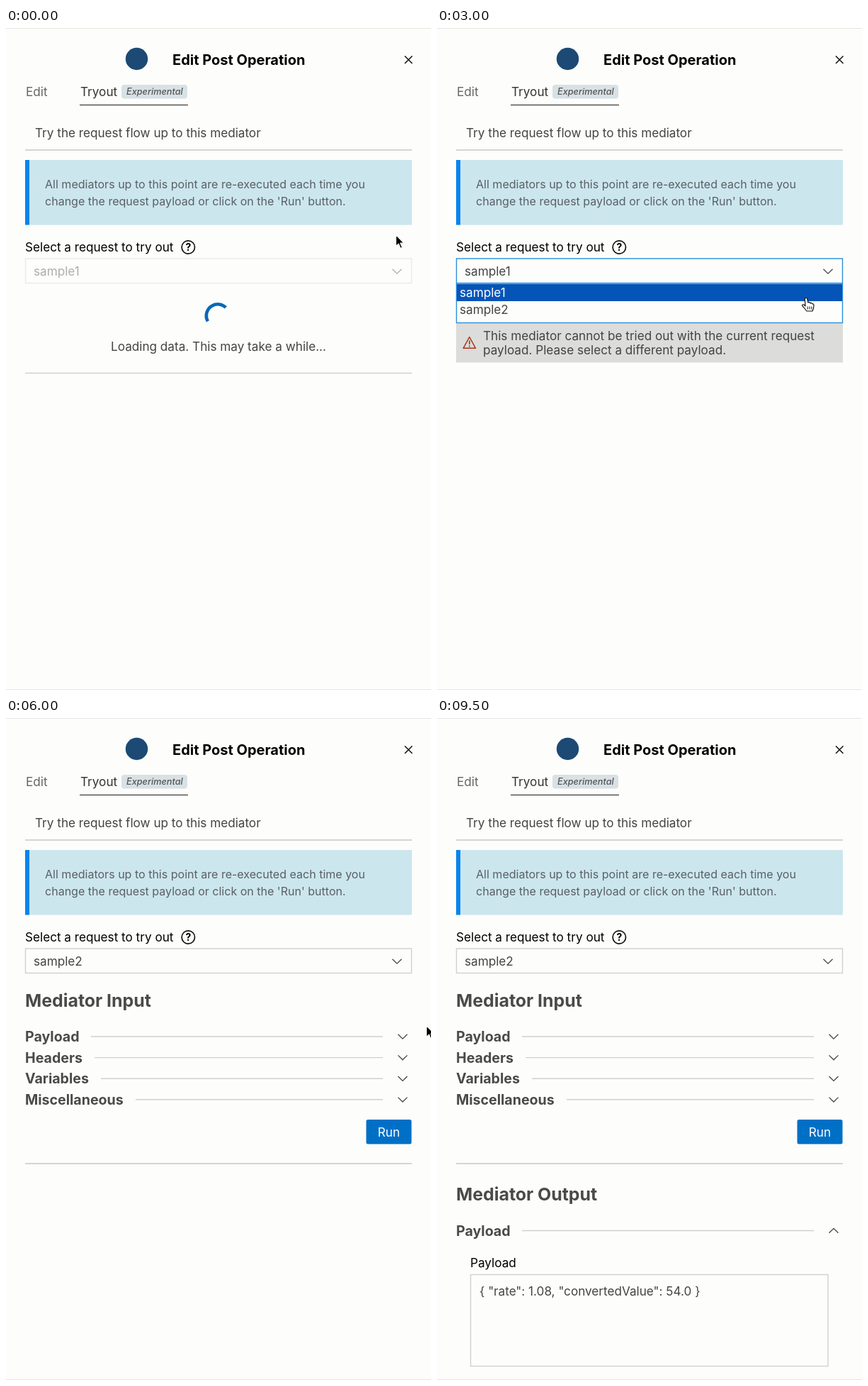
An HTML page that plays this animation: 600x933 px, repeating every 9600 ms.

```html
<!DOCTYPE html>
<html lang="en">
<head>
<meta charset="utf-8">
<title>Edit Post Operation</title>
<style>
  html, body { margin: 0; width: 100%; height: 100%; overflow: hidden; background: #fdfdfb; }
  svg { display: block; width: 600px; height: 933px; font: 17.15px Inter, "Open Sans", sans-serif; fill: #444; cursor: default; }
  .title { font-size: 20px; font-weight: 700; fill: #000; }
  .heading { font-size: 24.9px; font-weight: 700; fill: #4a4a4a; }
  .section { font-size: 19.6px; font-weight: 700; fill: #4a4a4a; }
  .line { fill: none; stroke-linecap: butt; }
  .black { fill: #000; }
</style>
</head>
<body>
<svg id="stage" viewBox="0 0 600 933"></svg>
<script>
const LOOP = 9600, STEP = 100;
const BG = '#fdfdfb', RULE = '#c9c9c9', BORDER = '#d0d0d2', FOCUS = '#2a8fdc';
const stage = document.getElementById('stage');

const text = (x, y, s, attrs = '') => `<text x="${x}" y="${y}" ${attrs}>${s}</text>`;
const rect = (x, y, w, h, fill, attrs = '') =>
  `<rect x="${x}" y="${y}" width="${w}" height="${h}" fill="${fill}" ${attrs}/>`;
const path = (d, color, width = 1.3, attrs = '') =>
  `<path class="line" d="${d}" stroke="${color}" stroke-width="${width}" ${attrs}/>`;
const rule = (x1, x2, y, color = RULE, width = 1.3) => path(`M${x1} ${y}H${x2}`, color, width);
const chevron = (x, y, up = false) => {
  const d = up ? -3.2 : 3.2;
  return path(`M${x - 6.5} ${y - d}L${x} ${y + d}L${x + 6.5} ${y - d}`, '#444');
};
const group = (id, content) => `<g id="${id}">${content}</g>`;

const SECTIONS = [['Payload', 120], ['Headers', 125], ['Variables', 134], ['Miscellaneous', 183]];
const section = ([name, lineX], y, up) =>
  text(27, y + 7, name, 'class="section"') + rule(lineX, 532, y, BORDER, 1.4) + chevron(560, y, up);
const sections = (list, y) => list.map((s, i) => section(s, y + i * 29.6)).join('');

const header =
  rule(0, 600, .5, '#e4e4e0', 1) + rule(0, 600, 932.5, '#e4e4e0', 1) +
  '<circle cx="184.5" cy="43.5" r="15.7" fill="#1c4a74"/>' +
  text(235, 52, 'Edit Post Operation', 'class="title"') +
  path('M563 39.5L573.5 50M573.5 39.5L563 50', '#111', 1.5) +
  text(28, 96, 'Edit', 'fill="#666"') + text(105, 96, 'Tryout', 'fill="#333"') +
  rect(163, 80, 93, 19.5, '#d8e1e5', 'rx="4"') +
  text(170, 94, 'Experimental', 'font-size="12.7" font-style="italic" font-weight="500" fill="#555"') +
  rule(104, 257, 108.5, '#555') +
  text(41, 154, 'Try the request flow up to this mediator') +
  rule(27, 573, 172) +
  rect(27, 186, 546, 91.5, '#cce6ee') + rect(27, 186, 6, 91.5, '#0a84ec') +
  '<g font-size="16.05" fill="#5a6064">' +
  text(55, 226, 'All mediators up to this point are re-executed each time you') +
  text(55, 250, "change the request payload or click on the 'Run' button.") + '</g>' +
  text(27, 315, 'Select a request to try out', 'class="black"') +
  '<circle cx="257.3" cy="309" r="9.2" fill="none" stroke="#111" stroke-width="1.7"/>' +
  text(257.3, 314, '?', 'class="black" font-size="14" font-weight="700" text-anchor="middle"');

const select = rect(27.5, 325, 545, 34.5, BG, `id="selectBox" stroke="${BORDER}" stroke-width="1.4"`) +
  text(39, 349, '', 'id="selected"') + chevron(552, 343);

const loading =
  '<circle id="ring" cx="299" cy="405.5" r="16.2" fill="none" stroke="#0868b8" stroke-width="4.6"/>' +
  text(300, 455, 'Loading data. This may take a while...', 'text-anchor="middle"') +
  rule(27, 573, 486.3);

const failure = rule(27, 573, 387.3, BORDER) + rect(27, 415.5, 546, 56, '#dcdcda') +
  path('M45.8 435.5L54.5 451.3H37.1Z', '#a8341a', 1.5, 'stroke-linejoin="round"') +
  path('M45.8 440.5V446M45.8 447.6V449.4', '#a8341a', 1.6) +
  text(65, 440, 'This mediator cannot be tried out with the current request') +
  text(65, 460.3, 'payload. Please select a different payload.');

const options = rect(27.5, 360, 545, 55.5, BG, `stroke="${FOCUS}" stroke-width="1.4"`) +
  rect(28, 361, 544, 24, '#0555b8', 'id="highlight"') +
  text(32, 379, 'sample1', 'id="option1"') + text(32, 403, 'sample2', 'id="option2"');

const input = text(27, 406.5, 'Mediator Input', 'class="heading"') + sections(SECTIONS, 449) +
  rect(508.5, 566, 64, 34.5, '#0070c6', 'rx="2.5"') +
  text(540.5, 590, 'Run', 'fill="#fff" text-anchor="middle"') + rule(27, 573, 628);

const output = text(27, 680, 'Mediator Output', 'class="heading"') +
  rect(546, 708, 27.5, 29.5, '#bcbcba', 'id="hover" rx="5"') +
  group('collapsed', sections(SECTIONS, 722.5)) +
  group('expanded', section(SECTIONS[0], 722.5, true) +
    text(47, 774, 'Payload', 'class="black"') +
    rect(47.5, 784.5, 504.5, 129, 'none', `stroke="${BORDER}" stroke-width="1.4"`) +
    text(60, 814, '{ "rate": 1.08, "convertedValue": 54.0 }'));

const outline = (d, fill, stroke) =>
  `<path d="${d}" fill="${fill}" stroke="${stroke}" stroke-width="1.2" stroke-linejoin="round"/>`;
const pointer = group('pointer',
  group('arrow', outline('M0 0V16L3.7 12.6L6.4 19L9 17.9L6.3 11.7H11.3Z', '#000', '#fff')) +
  group('hand', outline('M-1.7 1C-1.7-1 1.5-1 1.8 1L3 6C4 5 6 5.5 6 7C7 6 8.7 6.5 9 8C10.2 7.5 11 8.3 11 9.5' +
    'L10.5 14L9 18H1L-3 13C-5.5 11-6 9.5-5 9C-4 8.2-2 9.5-1 11Z', '#fff', '#111') +
    path('M2.2 11.5V15.5M5 11.5V15.5M7.8 11.5V15.5', '#111', 1)) +
  group('resize', outline('M-7.5 0L-2.5-4.5V-1.5H2.5V-4.5L7.5 0L2.5 4.5V1.5H-2.5V4.5Z', '#000', '#fff')));

stage.innerHTML = rect(0, 0, 600, 933, BG) + header + group('select', select) + group('loading', loading) +
  group('failure', failure) + group('options', options) + group('input', input) +
  group('output', output) + pointer;

const el = {};
stage.querySelectorAll('[id]').forEach(node => el[node.id] = node);
const show = (id, on) => el[id].style.display = on ? '' : 'none';
const within = (v, a, b) => v >= a && v < b;

// Pointer stops: time, x, y
const STOPS = [[0, 550.5, 291.5], [1100, 550.5, 291.5], [1700, 552, 341], [2300, 552, 341], [3000, 521, 381],
  [3300, 521, 397], [3700, 521, 397], [4400, 601, 447], [5500, 601, 447], [5800, 593.5, 433.5],
  [6100, 593.5, 433.5], [6500, 545, 583], [6800, 545, 583], [7300, 564.5, 718.5], [LOOP, 564.5, 718.5]];

function pointerAt(t) {
  const i = STOPS.findIndex(stop => stop[0] > t);
  const [t0, x0, y0] = STOPS[i - 1], [t1, x1, y1] = STOPS[i];
  const p = (t - t0) / (t1 - t0), e = p * p * (3 - 2 * p);
  return [x0 + (x1 - x0) * e, y0 + (y1 - y0) * e];
}

// The arc grows to a half circle and shrinks again while it turns.
function drawRing(cycle) {
  const p = cycle % 1;
  const turn = p < .5 ? 900 * p : 450 + 1260 * (p - .5);
  const arc = 16.2 * Math.PI * (1 - Math.abs(2 * p - 1));
  el.ring.setAttribute('stroke-dasharray', `${arc} 200`);
  el.ring.setAttribute('transform', `rotate(${turn} 299 405.5)`);
}

function draw(t) {
  const [x, y] = pointerAt(t);
  const second = t >= 3600;
  const busy = t < 400 || within(t, 3600, 5400);
  const open = within(t, 1900, 3600);
  const ready = t >= 5400, done = t >= 6800, expanded = t >= 7600;
  const pointing = t < 8500;

  el.select.style.opacity = busy ? .42 : 1;
  el.selectBox.setAttribute('stroke', open ? FOCUS : BORDER);
  el.selected.textContent = second ? 'sample2' : 'sample1';
  show('loading', busy);
  show('failure', !busy && !second);
  show('input', ready);
  show('output', done);
  show('collapsed', !expanded);
  show('expanded', expanded);
  drawRing(second ? .565 + (t - 4700) / 2000 : .548 + t / 2000);

  show('options', open);
  const lower = y > 385;
  el.highlight.setAttribute('y', lower ? 385 : 361);
  el.option1.setAttribute('fill', lower ? '#444' : '#fff');
  el.option2.setAttribute('fill', lower ? '#fff' : '#444');

  const overToggle = done && within(x, 546, 574) && within(y, 708, 738);
  const overRun = ready && within(x, 508, 573) && within(y, 566, 601);
  const overSelect = !busy && within(y, 325, open ? 416 : 360);
  const resize = x > 597, hand = overToggle || overRun || overSelect;
  show('hover', overToggle && pointing);
  show('pointer', pointing);
  show('resize', resize);
  show('hand', hand && !resize);
  show('arrow', !hand && !resize);
  el.pointer.setAttribute('transform', `translate(${x} ${y})`);
}

const start = performance.now();
function tick() {
  const t = (performance.now() - start) % LOOP;
  draw(Math.floor(t / STEP) * STEP);
  requestAnimationFrame(tick);
}
tick();
</script>
</body>
</html>
```
